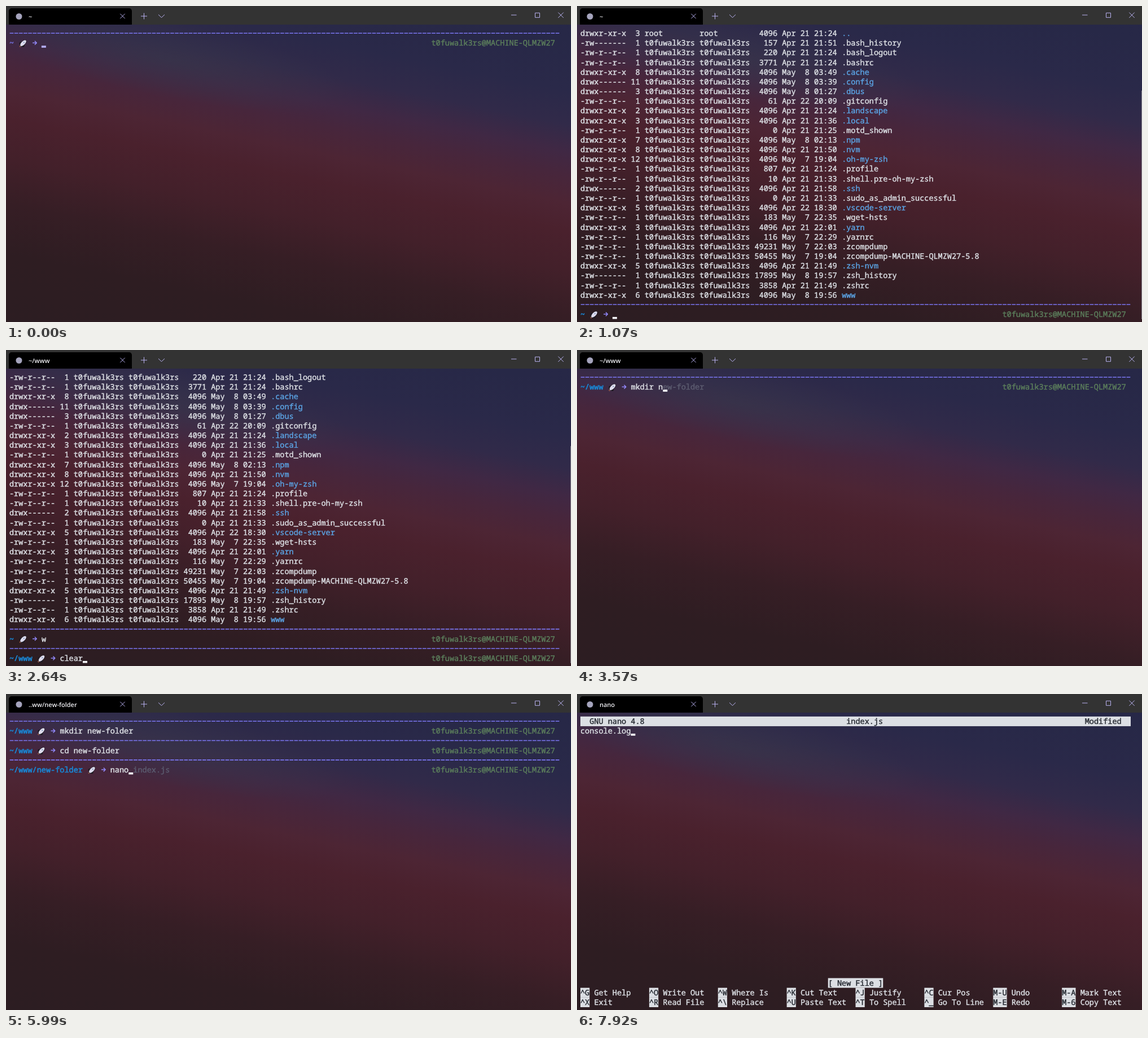
Write an HTML page with a canvas that moves like this. It is 1001x560 px and loops after 7.99 s.

```html
<!DOCTYPE html>
<html lang="en">
<head>
<meta charset="utf-8">
<title>Terminal session</title>
<style>
  html, body { margin: 0; width: 100%; height: 100%; overflow: hidden; background: #2d1d22; }
  canvas { display: block; }
</style>
</head>
<body>
<canvas id="stage" width="1001" height="560"></canvas>
<script>
const LOOP = 7990, ROWS = 30, COLS = 120;
const LEFT = 6, CELL = 8.125, TOP = 48.5, LINE = 17.17;
const USER = 't0fuwalk3rs', HOST = 'MACHINE-QLMZW27';
const color = {
  text: '#dcdfe4', dark: '#282c34', dir: '#5ba3e3', path: '#1a84d0', rule: '#7b76f2',
  arrow: '#9288fa', user: '#5b7d5b', ghost: '#5c5c70', icon: '#b9b2f2'
};
const ctx = document.getElementById('stage').getContext('2d');
ctx.textRendering = 'geometricPrecision';
ctx.lineJoin = 'round';

const MODES = { d: 'drwxr-xr-x', p: 'drwx------', f: '-rw-r--r--', s: '-rw-------' };
const FILES = `d|10|4096|May  8 19:57|.
d|3|4096|Apr 21 21:24|..
s|1|157|Apr 21 21:51|.bash_history
f|1|220|Apr 21 21:24|.bash_logout
f|1|3771|Apr 21 21:24|.bashrc
d|8|4096|May  8 03:49|.cache
p|11|4096|May  8 03:39|.config
p|3|4096|May  8 01:27|.dbus
f|1|61|Apr 22 20:09|.gitconfig
d|2|4096|Apr 21 21:24|.landscape
d|3|4096|Apr 21 21:36|.local
f|1|0|Apr 21 21:25|.motd_shown
d|7|4096|May  8 02:13|.npm
d|8|4096|Apr 21 21:50|.nvm
d|12|4096|May  7 19:04|.oh-my-zsh
f|1|807|Apr 21 21:24|.profile
f|1|10|Apr 21 21:33|.shell.pre-oh-my-zsh
p|2|4096|Apr 21 21:58|.ssh
f|1|0|Apr 21 21:33|.sudo_as_admin_successful
d|5|4096|Apr 22 18:30|.vscode-server
f|1|183|May  7 22:35|.wget-hsts
d|3|4096|Apr 21 22:01|.yarn
f|1|116|May  7 22:29|.yarnrc
f|1|49231|May  7 22:03|.zcompdump
f|1|50455|May  7 19:04|.zcompdump-${HOST}-5.8
d|5|4096|Apr 21 21:49|.zsh-nvm
s|1|17895|May  8 19:57|.zsh_history
f|1|3858|Apr 21 21:49|.zshrc
d|6|4096|May  8 19:56|www`.split('\n').map(line => line.split('|'));

// Each prompt appears at `at`; its command is typed from `type`, one key per `step` ms.
const PROMPTS = [
  { at: 0, path: '~' },
  { at: 140, path: '~' },
  { at: 340, path: '~', cmd: 'ls -al', type: 465, step: 66, lists: true },
  { at: 930, path: '~', cmd: 'w', type: 1625, step: 66 },
  { at: 1900, path: '~/www', title: '~/www', cmd: 'clear', type: 2380, step: 64 },
  { at: 2900, path: '~/www', title: '~/www', cmd: 'mkdir new-folder', type: 3222, step: 58, hint: true, clears: true },
  { at: 4250, path: '~/www', title: '~/www', cmd: 'cd new-folder', type: 4590, step: 66, hint: true, tab: 5000 },
  { at: 5350, path: '~/www/new-folder', title: '..ww/new-folder', cmd: 'nano index.js', type: 5772, step: 67, hint: true }
];
const NANO = { at: 6720, text: 'console.log', type: 7262, step: 65.7 };
const KEYS = [
  '^G Get Help,^O Write Out,^W Where Is,^K Cut Text,^J Justify,^C Cur Pos,M-U Undo,M-A Mark Text',
  '^X Exit,^R Read File,^\\ Replace,^U Paste Text,^T To Spell,^_ Go To Line,M-E Redo,M-6 Copy Text'
].map(row => row.split(',').map(item => [item.split(' ')[0], item.slice(item.indexOf(' ') + 1)]));

const colX = col => LEFT + col * CELL;
const rowY = row => TOP + row * LINE;
const typedCount = (text, start, step, t) =>
  t < start ? 0 : Math.min(text.length, 1 + Math.floor((t - start) / step));

// A thin outline gives the regular face a semi-bold weight.
function write(text, col, row, fill = color.text, outline = 0.45) {
  const x = colX(col), y = rowY(row) + 4.6;
  ctx.font = '13.54px "Noto Sans Mono", monospace';
  ctx.fillStyle = ctx.strokeStyle = fill;
  ctx.lineWidth = outline;
  ctx.fillText(text, x, y);
  ctx.strokeText(text, x, y);
}

function writeInverse(text, col, row, width = text.length) {
  ctx.fillStyle = color.text;
  ctx.fillRect(colX(col), rowY(row) - 8.6, width * CELL, LINE);
  write(text, col, row, color.dark);
}

function cursor(col, row, fill) {
  ctx.fillStyle = fill;
  ctx.fillRect(colX(col), rowY(row) + 4.6, 8, 3.6);
}

function stroke(points, fill, width = 1) {
  ctx.strokeStyle = fill;
  ctx.lineWidth = width;
  ctx.beginPath();
  for (let i = 0; i < points.length; i += 2) ctx.lineTo(points[i], points[i + 1]);
  ctx.stroke();
}

function cross(x, y, r) {
  stroke([x - r, y - r, x + r, y + r], color.icon);
  stroke([x - r, y + r, x + r, y - r], color.icon);
}

function blob(x, y, rx, ry, fill) {
  ctx.fillStyle = fill;
  ctx.beginPath();
  ctx.ellipse(x, y, rx, ry, 0, 0, 2 * Math.PI);
  ctx.fill();
}

function rocket(x, y) {
  ctx.save();
  ctx.translate(x, y);
  ctx.rotate(Math.PI / 4);
  blob(0, 3, 5.6, 3.2, '#1d1a22');
  blob(0, 6.8, 1.6, 2, '#b0654c');
  blob(0, 0, 3.9, 7.6, '#1d1a22');
  blob(0, -0.2, 3.2, 6.8, '#dedcee');
  blob(0, -2, 1.1, 1.1, '#7d93b8');
  ctx.restore();
}

function wallpaper() {
  // Bands slope down to the right at 0.2 px per px.
  const from = -200, to = 560, point = s => [-0.2 * s / 1.04, s / 1.04];
  const gradient = ctx.createLinearGradient(...point(from), ...point(to));
  const bands = [[-200, '#262747'], [-140, '#272847'], [-50, '#2a2949'], [10, '#312a49'], [60, '#402844'],
    [100, '#47263c'], [150, '#4d2534'], [200, '#4a212d'], [270, '#43202a'], [350, '#361e25'],
    [440, '#2e1d22'], [560, '#2c1d22']];
  for (const [s, fill] of bands) gradient.addColorStop((s - from) / (to - from), fill);
  ctx.fillStyle = gradient;
  ctx.fillRect(0, 0, 1001, 560);

  // Slate haze in the upper left, stretched along the bands.
  ctx.save();
  ctx.translate(290, 95);
  ctx.rotate(Math.atan(0.2));
  ctx.scale(1, 0.2);
  const haze = ctx.createRadialGradient(0, 0, 0, 0, 0, 340);
  haze.addColorStop(0, '#36384c99');
  haze.addColorStop(1, '#36384c00');
  ctx.fillStyle = haze;
  ctx.fillRect(-340, -340, 680, 680);
  ctx.restore();
}

function titleBar(title) {
  ctx.fillStyle = '#333333';
  ctx.fillRect(0, 0, 1001, 33);
  ctx.fillStyle = '#000';
  ctx.beginPath();
  ctx.roundRect(5, 4, 218, 29, [5, 5, 0, 0]);
  ctx.fill();
  blob(23, 18.5, 5.5, 5.5, '#a5a4bd');
  ctx.font = '600 11px "Open Sans", sans-serif';
  ctx.fillStyle = '#f0f0f4';
  ctx.fillText(title, 40, 22.7);
  cross(206.5, 18, 4.2);
  stroke([239, 18, 250, 18], color.icon);
  stroke([244.5, 12.5, 244.5, 23.5], color.icon);
  stroke([270, 15.3, 275.5, 20.5, 281, 15.3], color.icon);
  stroke([895, 16, 904.5, 16], color.icon);
  ctx.strokeRect(937.5, 12.3, 8, 8);
  cross(983, 16.2, 4.7);
}

function drawRule(row) {
  ctx.setLineDash([6.7, CELL - 6.7]);
  stroke([colX(0) + 0.7, rowY(row) - 0.3, colX(COLS), rowY(row) - 0.3], color.rule, 1.6);
  ctx.setLineDash([]);
}

function drawFile([mode, links, size, date, name], row) {
  const isDir = mode === 'd' || mode === 'p';
  const owner = (name === '..' ? 'root' : USER).padEnd(11);
  write([MODES[mode], links.padStart(2), owner, owner, size.padStart(5), date].join(' '), 0, row);
  write(name, 57, row, isDir ? color.dir : color.text);
}

function drawPrompt(prompt, isLast, row, t) {
  const { path, cmd = '', type, step, hint, tab } = prompt;
  const fresh = t < 465;
  const arrowCol = path.length + 4, start = path.length + 6;
  write(path, 0, row, fresh ? '#6f6bd2' : color.path, 0.7);
  rocket(colX(path.length + 2), rowY(row) + 0.3);
  const x = colX(arrowCol), y = rowY(row) - 0.3;
  stroke([x + 0.5, y, x + 7.5, y], color.arrow, 1.5);
  stroke([x + 4.3, y - 3.3, x + 7.6, y, x + 4.3, y + 3.3], color.arrow, 1.5);
  write(`${USER}@${HOST}`, 92, row, color.user);

  const count = typedCount(cmd, type, step, t);
  let entered = cmd.slice(0, count);
  if (isLast && t >= tab) entered = cmd + '/';
  if (hint && count > 0 && entered.length < cmd.length)
    write(cmd.slice(count), start + count, row, color.ghost);
  write(entered, start, row);
  if (isLast) cursor(start + entered.length, row, fresh ? '#b3adf5' : '#f4f4f8');
}

function drawShell(t) {
  const shown = PROMPTS.filter(p => p.at <= t);
  const last = shown[shown.length - 1];
  const first = Math.max(0, shown.findIndex(p => p.clears));
  const lines = [];
  shown.slice(first).forEach(prompt => {
    const isLast = prompt === last;
    lines.push(drawRule, row => drawPrompt(prompt, isLast, row, t));
    if (prompt.lists && !isLast) {
      lines.push(row => write('total 228', 0, row));
      FILES.forEach(file => lines.push(row => drawFile(file, row)));
    }
  });
  lines.slice(-ROWS).forEach((draw, row) => draw(row));

  if (lines.length > ROWS) {
    const thumb = 42 + 513 * (1 - ROWS / lines.length);
    ctx.fillStyle = '#85828c';
    ctx.fillRect(1000, thumb, 1, 555 - thumb);
  }
  return last.title || '~';
}

function drawNano(t) {
  const count = typedCount(NANO.text, NANO.type, NANO.step, t);
  writeInverse('  GNU nano 4.8', 0, 0, COLS);
  write('index.js', 58, 0, color.dark);
  if (count) write('Modified', 110, 0, color.dark);
  write(NANO.text.slice(0, count), 0, 1);
  cursor(count, 1, '#f4f4f8');
  writeInverse('[ New File ]', 54, 27);
  KEYS.forEach((items, i) => items.forEach(([key, label], j) => {
    writeInverse(key, j * 15, 28 + i);
    write(label, j * 15 + key.length + 1, 28 + i);
  }));
  return 'nano';
}

const startTime = performance.now();
function frame() {
  const t = (performance.now() - startTime) % LOOP;
  wallpaper();
  titleBar(t < NANO.at ? drawShell(t) : drawNano(t));
  requestAnimationFrame(frame);
}
frame();
</script>
</body>
</html>
```
